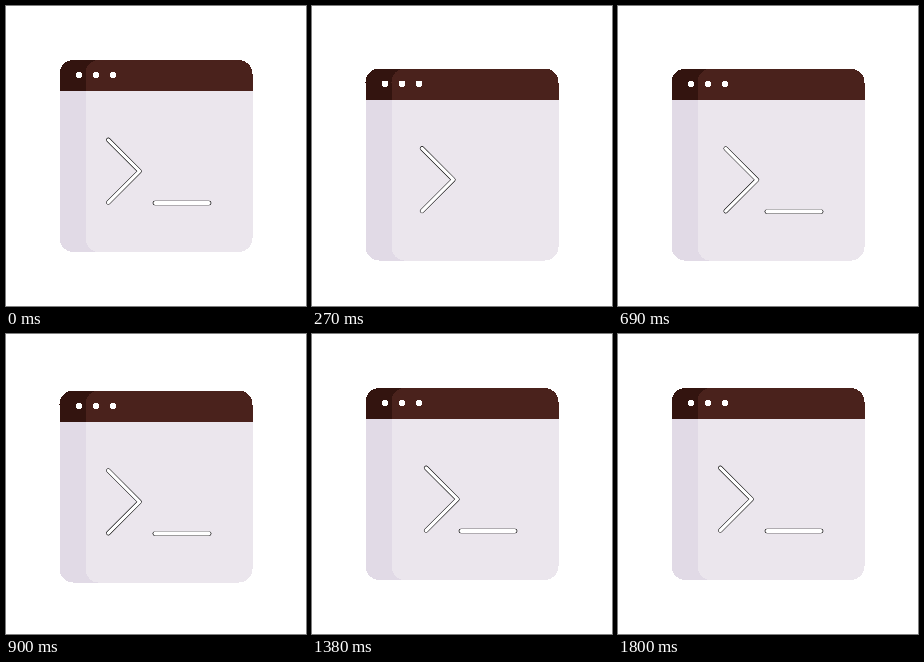
An HTML page that plays this animation: 300x300 px, repeating every 3830 ms.

```html
<!DOCTYPE html>
<html lang="en">
<head>
<meta charset="utf-8">
<title>Terminal window</title>
<style>
  html, body { margin: 0; width: 100%; height: 100%; overflow: hidden; background: #fff; }
  svg { display: block; width: 100%; height: 100%; }
  .crisp { shape-rendering: crispEdges; }
  .ink { fill: none; stroke-linecap: round; stroke-linejoin: round; }
  .edge { stroke: #000; stroke-width: 4.4; }
  .core { stroke: #fff; stroke-width: 3.3; }
  #cursor .core { stroke-width: 4; }
</style>
</head>
<body>
<svg viewBox="0 0 300 300">
  <defs>
    <path id="arrow" d="M102.3 133.9 L133.6 165.2 L102.3 196.5"/>
  </defs>
  <g id="window">
    <g class="crisp">
      <path fill="#e1dae6" d="M53.5 85 H100 V246 H67.5 a14 14 0 0 1 -14 -14 Z"/>
      <path fill="#33140f" d="M53.5 85 V68 a14 14 0 0 1 14 -14 H100 V85 Z"/>
      <path fill="#ebe6ed" d="M79.5 85 H246.5 V232 a14 14 0 0 1 -14 14 H92.5 a13 14 0 0 1 -13 -14 Z"/>
      <path fill="#4a221c" d="M79.5 85 V68 a13 14 0 0 1 13 -14 H232.5 a14 14 0 0 1 14 14 V85 Z"/>
    </g>
    <g class="crisp" fill="#fff">
      <circle cx="73" cy="69.2" r="3.2"/>
      <circle cx="90" cy="69.2" r="3.2"/>
      <circle cx="107" cy="69.2" r="3.2"/>
    </g>
    <g id="prompt" class="ink">
      <use href="#arrow" class="edge"/>
      <use href="#arrow" class="core"/>
    </g>
    <g id="cursor" class="ink">
      <path class="edge" d="M148.8 197 H203.2"/>
      <path class="core" d="M149.3 197 H202.7"/>
    </g>
  </g>
</svg>
<script>
  const LOOP = 3830, ACTIVE = 1800, STEP = 30;
  const [win, arrow, cursor] = ['window', 'prompt', 'cursor'].map(id => document.getElementById(id));

  // Eased progress from 0 to 1 between two times.
  const ease = (t, from, to) => {
    const s = Math.min(1, Math.max(0, (t - from) / (to - from)));
    return s * s * (3 - 2 * s);
  };

  function draw(now) {
    const elapsed = Math.min(now % LOOP, ACTIVE);
    const t = Math.floor(elapsed / STEP) * STEP;
    const drop = 12 * (ease(t, 0, 420) - ease(t, 480, 1080));
    const beat = t % 900;
    const push = 12 * (ease(beat, 0, 450) - ease(beat, 450, 900));
    win.setAttribute('transform', `translate(0 ${drop})`);
    arrow.setAttribute('transform', `translate(${push} 0)`);
    cursor.setAttribute('visibility', t >= 150 && t < 390 ? 'hidden' : 'visible');
  }

  let start;
  function tick(now) {
    start ??= now;
    draw(now - start);
    requestAnimationFrame(tick);
  }
  draw(0);
  requestAnimationFrame(tick);
</script>
</body>
</html>
```
